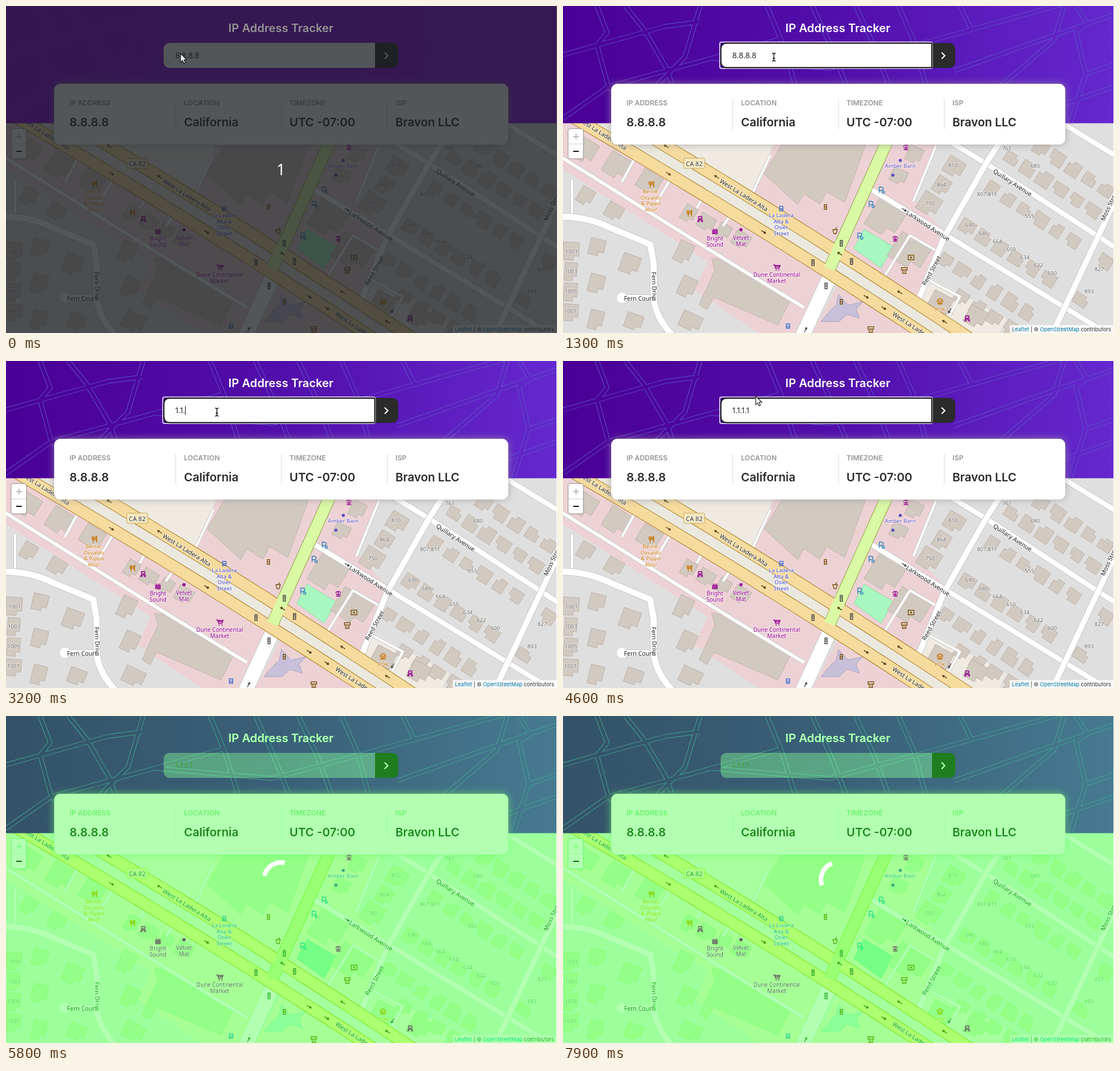
Write an HTML page that moves like this. It is 972 by 576 pixels and loops after 8000 ms.

```html
<!DOCTYPE html>
<html lang="en">
<head>
<meta charset="utf-8">
<title>IP Address Tracker</title>
<style>
html, body { margin: 0; width: 100%; height: 100%; overflow: hidden; background: #fff; }
svg { display: block; width: 972px; height: 576px; }
text { font-family: "Noto Sans", sans-serif; }
.ui text { font-family: Inter, sans-serif; }
.map text { text-anchor: middle; paint-order: stroke; stroke: #fff9; stroke-width: 2px; stroke-linejoin: round; }
.retail { fill: #edd2d5; }
.office { fill: #efebe2; }
.house { fill: #d2c9c0; stroke: #b9ada3; stroke-width: .8; }
.head { font-size: 12.3px; font-weight: 600; fill: #969696; }
.value { font-size: 20.6px; font-weight: 600; fill: #2b2b2b; }
#title { font-size: 20.3px; font-weight: 600; fill: #fff; text-anchor: middle; }
#field { fill: #fff; }
#entry { font-size: 13.4px; fill: #2b2b2b; }
#tint, #veil { fill: none; }
.dark #tint { fill: #9600f0cc; }
.dark #veil { fill: #1a1e22bf; }
.dark #title { fill: #939393; }
.busy #page { filter: url(#green); }
.busy #field { fill: #efefef4d; }
.busy #entry { fill: #545454; }
</style>
</head>
<body>
<svg viewBox="0 0 972 576">
  <defs>
    <linearGradient id="purple" gradientUnits="userSpaceOnUse" x2="972">
      <stop stop-color="#4a0096"/><stop offset=".5" stop-color="#520eab"/><stop offset="1" stop-color="#6528cf"/>
    </linearGradient>
    <filter id="glow" x="-5%" y="-30%" width="110%" height="160%"><feGaussianBlur stdDeviation="7"/></filter>
    <filter id="green" filterUnits="userSpaceOnUse" x="0" y="0" width="972" height="576" color-interpolation-filters="sRGB">
      <feColorMatrix values=".7 0 0 0 0  0 1 0 0 .32  0 0 .7 0 0  0 0 0 1 0"/>
    </filter>
    <clipPath id="view"><path d="M0 206H971V576H0Z"/></clipPath>
    <clipPath id="top"><path d="M0 0H971V206.500H0Z"/></clipPath>
  </defs>

  <g id="page">
  <g class="map" clip-path="url(#view)">
    <path fill="#e0dfdf" d="M0 206H971V576H0Z"/>
    <path class="retail" d="M0 206H70L470 470 415 576H345L232 500 255 450 0 288ZM372 244H662L620 340 680 405 625 515 335 335ZM487 485 612 576H440Z"/>
    <path class="office" d="M120 206H384L335 335 180 246ZM645 478 782 550 770 576H700L620 520Z"/>
    <path fill="#a9f7c0" stroke="#8fd9a8" d="M531 393 583 424 561 462 513 427Z"/>
    <path class="house" d="M386 244H534L497 346 465 327 453 349 425 331 414 350 355 296ZM262 444 281 447 401 519 379 562 266 513 254 535 240 526 268 465Z"/>
    <path fill="#c8c0da" stroke="#aaa2bf" d="M455 556 473 535 482 527 486 508 503 527 529 521 517 534 523 550 501 543 487 556Z"/>
    <g id="houses"></g>
    <g id="roads"></g>
    <g id="icons"></g>
    <g id="labels"></g>
    <rect x="213" y="268" width="37" height="18" rx="2" fill="#f4e7bd" stroke="#c6a75e"/>
    <text x="231.500" y="281.500" font-size="11" fill="#333">CA 82</text>
  </g>

  <g class="ui">
    <path fill="#fff" d="M788 562H971V576H788Z" opacity=".75"/>
    <text x="792" y="573" font-size="9.300" fill="#333"><tspan fill="#0078a8">Leaflet</tspan> | © <tspan fill="#0078a8">OpenStreetMap</tspan> contributors</text>
    <rect x="9" y="216" width="27" height="53" rx="4" fill="#fff" stroke="#0003" stroke-width="2"/>
    <path d="M10 243H35" stroke="#ccc"/>
    <path d="M18 230H28M23 225V235" stroke="#bbb" stroke-width="2"/>
    <path d="M18 256H28" stroke="#111" stroke-width="2"/>

    <path fill="url(#purple)" d="M0 0H971V206.500H0Z"/>
    <g id="lanes" clip-path="url(#top)"></g>
    <path id="tint" d="M0 0H971V206H0Z"/>
    <path id="field" d="M290 65H651V109H290Q278 109 278 97V77Q278 65 290 65Z"/>
    <path fill="#2b2b2b" d="M651 65H680Q692 65 692 77V97Q692 109 680 109H651Z"/>
    <path d="M668 82 673.500 87.500 668 93" fill="none" stroke="#fff" stroke-width="2.200"/>
    <g id="ring" fill="none">
      <rect x="276.500" y="63.500" width="375" height="46.500" rx="3" stroke="#fff" stroke-width="1.500"/>
      <path d="M289 65.500H650.500V108.500H289Q278.500 108.500 278.500 98V76Q278.500 65.500 289 65.500Z" stroke="#101010" stroke-width="2"/>
    </g>
    <rect id="selection" x="299" y="78" width="45" height="18" fill="#3367d1"/>
    <text id="entry" x="298.500" y="91.500"></text>
    <path id="caret" d="M0 79V95" stroke="#111"/>

    <rect x="85" y="137" width="801" height="107" rx="11" fill="#969696" opacity=".75" filter="url(#glow)"/>
    <rect x="85" y="137" width="801" height="107" rx="11" fill="#fff"/>
    <path d="M299.500 164V217M486 164V217M672.500 164V217" stroke="#d9d9d9"/>
    <g id="facts"></g>
    <path id="veil" d="M0 0H972V576H0Z"/>
    <text id="title" x="485" y="45.500">IP Address Tracker</text>
  </g>
  </g>

  <text id="count" x="485" y="298" font-size="27" fill="#fff" text-anchor="middle">1</text>
  <path id="spinner" d="M463.800 266.800A30 30 0 0 1 506.200 266.800" fill="none" stroke="#fff" stroke-width="8"/>
  <path id="arrow" d="M0 0V15L3.500 11.800 5.800 17 8.300 16 6 10.800H10.800Z" fill="#fff" stroke="#111" stroke-width="1.100"/>
  <path id="beam" d="M-3-7Q0-7 0-5Q0-7 3-7M0-5V5M-3 7Q0 7 0 5Q0 7 3 7M-2 2H2" fill="none" stroke="#111" stroke-width="1.400"/>
</svg>
<script>
const $ = id => document.getElementById(id);
const add = (id, markup) => $(id).insertAdjacentHTML("beforeend", markup);
const show = (id, on) => $(id).setAttribute("visibility", on ? "visible" : "hidden");
const place = (id, x, y) => $(id).setAttribute("transform", `translate(${x} ${y})`);
const mix = (a, b, k) => a + (b - a) * k;

let seed = 7;
const rand = () => (seed = seed * 16807 % 2147483647) / 2147483647;

// Buildings: a box with one corner cut away
function house(x, y, turn, size = 23) {
  const a = size * mix(.4, .6, rand()), b = size * mix(.45, .6, rand());
  add("houses", `<path class="house" transform="translate(${x} ${y}) rotate(${turn})" d="M${-a} ${-b}H${a}V${b * .5}H${a * .35}V${b}H${-a}Z"/>`);
}
function row(n, x1, y1, x2, y2, turn, size) {
  for (let i = 0; i < n; i++) house(mix(x1, x2, i / (n - 1)), mix(y1, y2, i / (n - 1)), turn, size);
}
// The blocks on the right: a grid turned with the streets, leaving the crossing street free
for (const v of [-75, -32, 32, 112, 182, 222]) {
  for (let u = v > 200 ? 90 : 32; u < 300; u += 34) {
    const x = 747 + u * .84 - v * .54, y = 278 + u * .54 + v * .84;
    if (Math.abs(u - 240) > 22) house(x, y, 33 + 90 * Math.floor(4 * rand()));
  }
}
row(4, 14, 432, 13, 540, 4, 27);
row(3, 60, 425, 58, 553, 14, 30);
row(2, 118, 455, 125, 556, 20, 30);
row(3, 213, 434, 225, 556, 25, 32);
row(3, 38, 254, 152, 310, 32, 34);
row(4, 222, 366, 314, 412, 31, 25);
row(2, 40, 335, 90, 362, 30, 27);
row(3, 690, 284, 646, 349, 32, 30);
row(2, 570, 372, 611, 434, 32, 52);
row(2, 592, 300, 620, 262, 25, 26);
row(2, 664, 526, 728, 548, 28, 34);

// Streets: casing first, then the surface
function road(d, width, fill = "#fff", edge = "#c9c6c6", layer = "roads") {
  [[width + 2, edge], [width, fill]].forEach(([w, c]) =>
    add(layer, `<path d="${d}" fill="none" stroke="${c}" stroke-width="${w}" stroke-linejoin="round"/>`));
}
const roadY = x => 247 + .6 * (x - 182) + 6e-5 * (x - 182) ** 2;
function avenue(shift) {
  let d = "";
  for (let x = 0; x <= 760; x += 40) d += `${d ? "L" : "M"}${x} ${roadY(x) + shift}`;
  return d;
}
road("M0 268 200 393 300 455 425 531", 6);
road("M130 262 104 310M190 304 165 346M245 340 236 356M297 366 282 388M366 262 335 328M658 246 618 344M566 478 612 404 660 432M640 480 700 512 682 545M16 306V372", 4);
road("M104 514H163", 10);
road("M0 371Q45 372 82 390L154 420 160 455V515Q163 548 193 580", 11);
add("roads", `<circle cx="104" cy="514" r="9" fill="#fff"/>`);
road("M542 322 680 406 885 531 972 584M655 222 747 278 972 424M880 206 972 262", 9);
road("M792 206 747 276 672 408 628 516M972 346 935 425 885 531 862 580", 10);
add("roads", `<path d="${avenue(23)}" fill="none" stroke="#ebe8df" stroke-width="24"/>`);
road("M476 465 421 584", 25);
road("M571 240 470 463", 20, "#daf9a4", "#8f9f42");
for (const shift of [0, 46]) road(avenue(shift), 20, "#f6db9e", "#a87b1d");
add("roads", `<path d="M491 416 470 463" stroke="#daf9a4" stroke-width="20"/>`);

const lanes = ["M0 86 60 69 180 36 240 28M0 198 80 142 262 92 384 58M60 0 78 47 60 69 80 142 150 206M110 0 142 40 183 110 215 206M242 0 215 90 140 165",
  "M360 0 384 58 410 140M440 0 470 65 500 140M516 0 548 68 575 140M592 0 620 64 640 140M262 92 470 110 640 64 880 -3",
  "M690 114 868 51 972 15M750 160 866 60 884 0M880 174 972 142M700 0 720 40M905 0 925 32 905 45 922 120 972 103M922 120 895 206"];
road(lanes.join(""), 6, "url(#purple)", "#5b52c2", "lanes");

const icons = (d, color, ...spots) => spots.forEach(([x, y, turn = 0]) => add("icons",
  `<path transform="translate(${x} ${y}) rotate(${turn})" d="${d}" fill="none" stroke="${color}" stroke-width="1.400"/>`));
const dot = (x, y, color) => add("icons", `<circle cx="${x}" cy="${y}" r="2.800" fill="${color}"/>`);
const brown = "#7a5510", violet = "#93008f", blue = "#2c82bd", amber = "#c77400", indigo = "#5a4fc0";
const pointing = "M-5 0H4M1-2 4 0 1 2";
for (const x of [182, 271, 488, 594, 673]) icons(pointing, "#4d3a0c", [x, roadY(x), 212]);
for (const x of [186, 354, 535, 566]) icons(pointing, "#4d3a0c", [x, roadY(x) + 46, 32]);
icons(pointing, "#444", [602, 359, 32], [428, 570, -65], [682, 537, 120]);
icons("M-2-5H2V5H-2ZM-1-2H1M-1 1H1", "#444", [491, 418], [441, 452], [464, 493], [509, 450]);
icons("M-4-5V-1Q-4 1-2 1T0-1V-5M-2-5V6M4 6V-5Q2-4 2 1H4", amber, [156, 314], [223, 365]);
icons("M-3-5H3V-1H-3ZM-4 1H4M-4 5V2L-1 4M4 5V2L1 4", violet, [242, 376], [713, 551]);
icons("M-4 5V-5H-1Q3-5 3-2T-1 1H-4M1 4A2 2 0 1 0 5 4 2 2 0 1 0 1 4", blue, [562, 324], [544, 349], [524, 405]);
icons("M-3-4H3V3H-3ZM-3 0H3M-2 3V5M2 3V5", "#3f73d0", [385, 357], [397, 564]);
icons("M-2-5V5M2-5V5M-2-4H2M-2 4H2M-2 0H2", brown, [463, 354], [491, 521]);
icons("M-5-4H5V4H-5ZM-1 0A1 1 0 1 0 1 0 1 1 0 1 0-1 0", brown, [614, 443]);
icons("M-5-5H5V-1H-5ZM-3-1V5H3V-1M-1 2H1", brown, [602, 466], [543, 570]);
icons("M-4-2H4L2 5H-2ZM0-2 3-6", brown, [480, 396]);
icons("M-5-1Q-4-5 0-5T5-1ZM-5 2H5M-4 4H4", amber, [665, 521]);
icons("M-6-4H-4L-2 2H4L6-3H-4M-3-1H5M-2 5H0M3 5H5", violet, [377, 460]);
icons("M-4 4H4M0 4V-3M-4-1Q-4-4 0-4T4-1M-4 1H4", violet, [586, 410], [605, 249]);
icons("M-5-1H5M-5 1H5M-5 3H5M-5 5H5M-3-3H-1M1-3H3", violet, [268, 396]);
dot(314, 394, violet);
dot(595, 272, indigo);
dot(582, 298, indigo);

function label(lines, x, y, color = "#666", size = 9.6, turn = 0) {
  lines.split("|").forEach((s, i) => add("labels",
    `<text transform="translate(${x} ${y + i * size * 1.09}) rotate(${turn})" y="${size * .36}" font-size="${size}" fill="${color}">${s}</text>`));
}
function numbers(list, x1, y1, x2, y2) {
  list.split(" ").forEach((n, i, all) => {
    const k = i / (all.length - 1 || 1);
    label(n, mix(x1, x2, k), mix(y1, y2, k));
  });
}
const street = (name, x, y, turn) => label(name, x, y, "#222", 10.6, turn);
label("Bertie,|Osvaldo|&amp; Pippo|Also!", 155, 327, amber);
label("La Ladera|Alta &amp;|Osier|Street", 385, 369, "#4545d0");
label("Bright|Sound", 268, 409, violet, 10);
label("Velvet|Mat", 314, 408, violet, 10);
label("Dune Continental|Market", 377, 473, violet, 10);
label("Amber Barn", 595, 282, indigo);
label("PDK", 665, 535, amber);
street("West La Ladera Alta", 319, 333, 32);
street("West La Ladera Alta", 70, 225, 32);
street("West La Ladera", 614, 562, 33);
street("Larkwood Avenue", 644, 387, 33);
street("Quillary Avenue", 793, 311, 33);
street("Reed Street", 650, 466, -61);
street("Moss Street", 964, 351, -65);
street("Fern Drive", 161, 494, 88);
street("Fern Court", 134, 515, 0);
numbers("690 686 664 650 634 622 600", 718, 386, 863, 471);
numbers("1001 1003 1005 1007", 15, 433, 13, 538);
numbers("810 864 750", 688, 281, 647, 348);
numbers("761 680", 783, 251, 833, 282);
numbers("807,811 555", 748, 332, 823, 370);
numbers("827 893", 946, 464, 928, 503);
numbers("800", 446, 292);
numbers("1030", 318, 501);

[["IP ADDRESS", "8.8.8.8", 112], ["LOCATION", "California", 314], ["TIMEZONE", "UTC -07:00", 500], ["ISP", "Bravon LLC", 687]].forEach(([head, value, x]) =>
  add("facts", `<text class="head" x="${x}" y="175">${head}</text><text class="value" x="${x}" y="211.500">${value}</text>`));

const typing = [[0, "8.8.8.8"], [2100, ""], [2400, "1"], [2900, "1."], [3200, "1.1."], [3600, "1.1.1"], [3800, "1.1.1."], [3900, "1.1.1.1"]];
const path = [[100, 326, 90], [400, 372, 90], [4200, 372, 90], [4300, 377, 96], [4600, 340, 62]];

function pointer(t) {
  const i = path.findIndex(p => p[0] > t);
  if (i < 0) return path[path.length - 1].slice(1);
  if (i === 0) return [308, 84];
  const [t0, x0, y0] = path[i - 1], [t1, x1, y1] = path[i], k = (t - t0) / (t1 - t0);
  return [mix(x0, x1, k), mix(y0, y1, k)];
}

function draw(t) {
  const dark = t < 100, busy = t >= 4800, focus = t >= 700 && !busy;
  document.body.className = dark ? "dark" : busy ? "busy" : "";
  show("count", dark);
  show("ring", focus);

  const [since, value] = typing.filter(s => s[0] <= t).pop();
  const selected = t >= 1500 && t < 2100;
  const entry = $("entry");
  entry.textContent = value || "Search for any IP address";
  entry.style.fill = selected ? "#fff" : value ? "" : "#757575";
  show("selection", selected);
  show("caret", focus && !selected && t - Math.max(since, 800) < 500);
  place("caret", value ? 299 + entry.getComputedTextLength() : 299.5, 0);

  const [x, y] = pointer(t), arrow = dark || t >= 4500;
  show("arrow", arrow && t < 5200);
  show("beam", !arrow);
  place("arrow", x, y);
  place("beam", x, y);

  show("spinner", busy);
  $("spinner").setAttribute("transform", `rotate(${(t - 4800) / 1100 * 360} 485 288)`);
}

const start = performance.now();
function frame() {
  draw((performance.now() - start) % 8000);
  requestAnimationFrame(frame);
}
draw(0);
requestAnimationFrame(frame);
</script>
</body>
</html>
```
